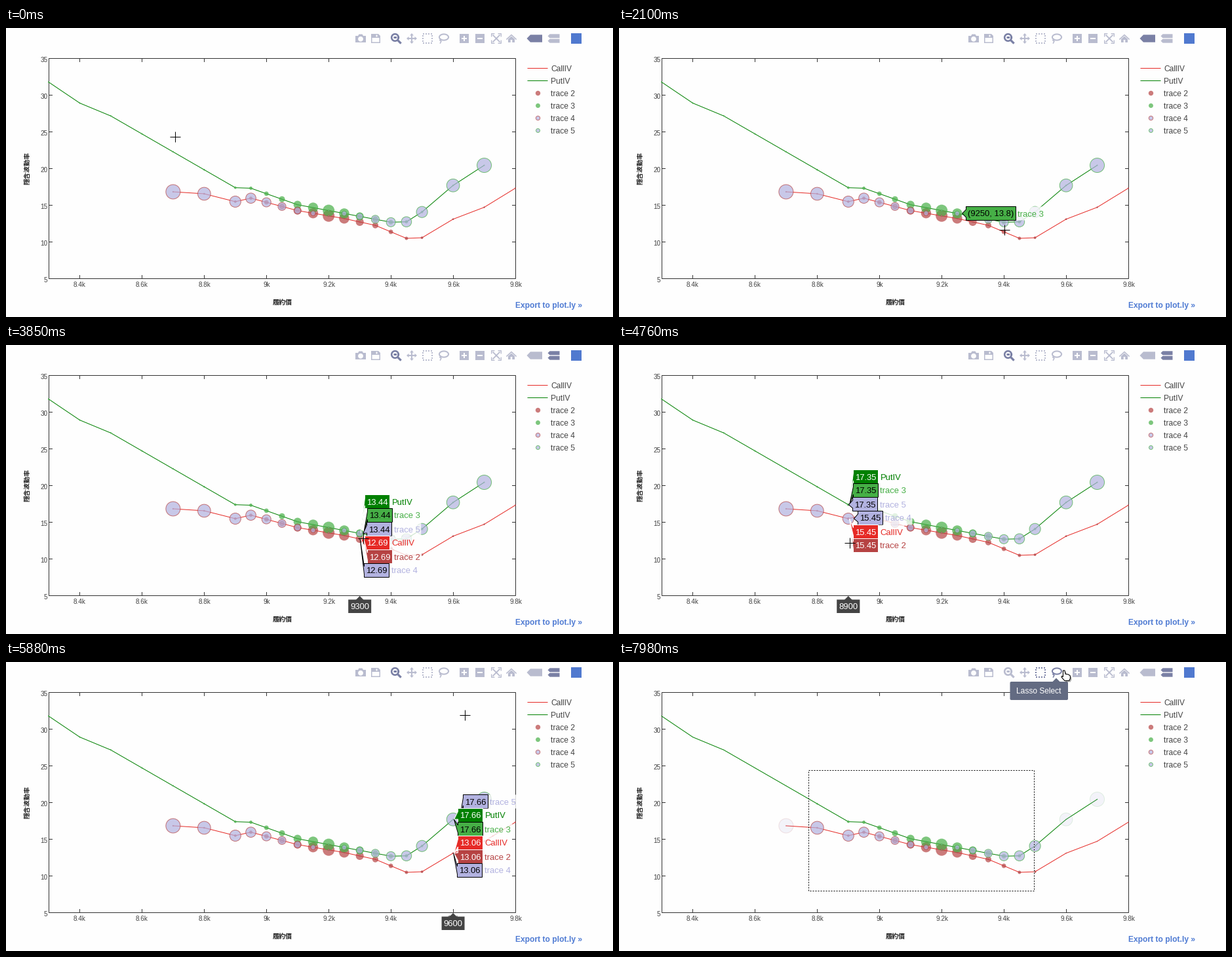
Write a matplotlib script that moves like this. It is 926x441 px and loops after 8000 ms.

```python
import numpy as np
import matplotlib
import matplotlib.pyplot as plt
from matplotlib.animation import FuncAnimation
from matplotlib.colors import to_rgba
from matplotlib.patches import Circle, FancyBboxPatch, Polygon, Rectangle

matplotlib.rcParams["font.family"] = ["Liberation Sans", "DejaVu Sans"]
matplotlib.rcParams["path.snap"] = False

W, H = 926, 441
PT = 0.72  # points per pixel at 100 dpi
LOOP, STEP, TICK = 8000, 40, 70
BG, INK, FRAME = "#fefefe", "#444444", "#333333"
LEFT, RIGHT, TOP, BOTTOM = 65.5, 777.5, 46.5, 382.5
RED, GREEN, ROSE, LEAF, LILAC = "#e62a26", "#008000", "#b64343", "#46af46", "#b2b2e0"
OFF, ON = "#b9bccf", "#7a80a5"

fig = plt.figure(figsize=(W / 100, H / 100), dpi=100, facecolor=BG)
ax = fig.add_axes([0, 0, 1, 1])
ax.set_xlim(0, W)
ax.set_ylim(H, 0)
ax.axis("off")


def px(k):
    return LEFT - 0.5 + (np.asarray(k) - 8300) * (RIGHT - LEFT) / 1500


def py(v):
    return BOTTOM - 0.5 - (np.asarray(v) - 5) * (BOTTOM - TOP) / 30


def crisp(a):
    """Centre of the pixel that holds coordinate a."""
    return float(np.floor(a + 0.01)) + 0.5


def line(xs, ys, color, lw=1.0, **kw):
    return ax.plot(xs, ys, color=color, lw=lw * PT, **kw)[0]


def text(x, y, s, size, color=INK, **kw):
    kw.setdefault("va", "baseline")
    return ax.text(x, y, s, fontsize=size * PT, color=color, **kw)


def poly(pts, color, edge="none", lw=0, **kw):
    return ax.add_patch(Polygon(pts, facecolor=color, edgecolor=edge, lw=lw * PT, **kw))


widths = {}


def width(s, size):
    if (s, size) not in widths:
        probe = text(0, 0, s, size)
        widths[s, size] = probe.get_window_extent().width
        probe.remove()
    return widths[s, size]


# ---- data: strikes are sparse at the wings, dense near the money ----
strikes = np.array([k for k in range(8300, 9801, 50) if k % 100 == 0 or 8900 < k < 9500])
put_k, call_k = strikes[strikes <= 9700], strikes[strikes >= 8700]
put_v = np.interp(put_k, *zip(
    (8300, 31.74), (8400, 28.88), (8500, 27.12), (8900, 17.35), (8950, 17.28), (9100, 15.03),
    (9400, 12.65), (9450, 12.7), (9500, 14.04), (9600, 17.66), (9700, 20.4)))
call_v = np.interp(call_k, *zip(
    (8700, 16.79), (8800, 16.52), (8900, 15.45), (8950, 15.92), (9100, 14.23), (9250, 13.15),
    (9350, 12.22), (9450, 10.45), (9500, 10.53), (9600, 13.06), (9700, 14.68), (9800, 17.28)))


def volume(k):
    return 1 + 8 * np.exp(-(np.abs(k - 9200) / 175) ** 1.4)


def depth(k, wing):
    """Marker area shrinks evenly from the wing strike towards the money."""
    return np.sqrt(np.maximum(121 - 0.24 * np.abs(k - wing), 0.3))


calls, puts = (call_k, call_v), (put_k, put_v)
curve = {2: calls, 3: puts, 4: calls, 5: puts}
radius = {2: volume(call_k), 3: volume(put_k), 4: depth(call_k, 8700), 5: depth(put_k, 9700)}
fills = {0: GREEN, 1: RED, 2: ROSE, 3: LEAF, 4: LILAC, 5: LILAC}
edges = {2: ROSE, 3: LEAF, 4: ROSE, 5: LEAF}
names = ["PutIV", "CallIV"] + [f"trace {n}" for n in curve]

# ---- axes, titles and legend ----
ax.add_patch(Rectangle((LEFT, TOP), RIGHT - LEFT, BOTTOM - TOP, fill=False, ec=FRAME, lw=PT))
for k in range(8400, 9801, 200):
    x = crisp(px(k))
    text(x, 395, f"{k / 1000:g}k", 10, ha="center")
    if k < 9800:
        line([x, x], [BOTTOM, BOTTOM - 5], FRAME)
        line([x, x], [TOP, TOP + 5], FRAME)
for v in range(5, 36, 5):
    y = crisp(py(v))
    text(63.5, y + 5, str(v), 10, ha="right")
    if 5 < v < 35:
        line([LEFT, LEFT + 5], [y, y], FRAME)
        line([RIGHT, RIGHT - 5], [y, y], FRAME)
CJK = dict(family="Noto Sans CJK JP", weight="bold", ha="center", va="center")
text(421.5, 418.5, "履約價", 10, "#222222", **CJK)
text(32.5, 214, "隱含波動率", 10, "#222222", rotation=90, **CJK)
text(777, 427, "Export to plot.ly »", 12, "#4f7bd3", weight="bold")

line(px(call_k), py(call_v), RED)
line(px(put_k), py(put_v), GREEN)

for row, n in enumerate([1, 0, 2, 3, 4, 5]):
    y = 61.5 + 19 * row
    text(831, y + 4.5, names[n], 12)
    if n < 2:
        line([796, 826], [y, y], fills[n])
    else:
        ax.add_patch(Circle((811.5, y), 4.2 - 0.25 * n, fc=fills[n], ec=edges[n],
                            lw=PT if n > 3 else 0, alpha=0.7))

dots = {n: ax.scatter(px(ks), py(vs), s=(2 * radius[n] * PT) ** 2, zorder=3 + n / 10,
                      linewidths=PT if n > 3 else 0) for n, (ks, vs) in curve.items()}

# ---- mode bar ----
icons = {}
cutouts = []
ang = np.linspace(0, 2 * np.pi, 40)


def shape(name, pts):
    icons.setdefault(name, []).append(poly(pts, OFF, zorder=5))


def stroke(name, xs, ys, lw, **kw):
    icons.setdefault(name, []).append(line(xs, ys, OFF, lw, zorder=5, **kw))


def box(x0, y0, x1, y1):
    return [(x0, y0), (x1, y0), (x1, y1), (x0, y1)]


def oval(x, y, rx, ry):
    return x + rx * np.cos(ang), y + ry * np.sin(ang)


def cut(pts, color=BG):
    cutouts.append(poly(pts, color, zorder=6))


shape("camera", box(533, 12, 549, 22))
shape("camera", [(537, 12), (538.5, 9.5), (543.5, 9.5), (545, 12)])
cut(np.c_[oval(541, 16.8, 3.9, 3.9)])
stroke("camera", *oval(541, 16.8, 1.2, 1.2), 2, zorder_=None) if False else None
shape("save", [(557, 9), (568, 9), (571, 12), (571, 23), (557, 23)])
cut(box(558.5, 15, 569.5, 21.5))
cut(box(564.5, 10.5, 566.5, 13.5))
shape("zoom", box(591.5, 13, 596, 16))
stroke("zoom", *oval(593.5, 14.5, 5.3, 5.3), 2.6)
stroke("zoom", [598, 601.5], [19, 22.5], 3.2)
for dx, dy in [(1, 0), (-1, 0), (0, 1), (0, -1)]:
    x, y = 619 + 8 * dx, 16 + 8 * dy
    stroke("pan", [619, x - 2 * dx], [16, y - 2 * dy], 2)
    shape("pan", [(x, y), (x - 3.5 * dx + 3 * dy, y - 3.5 * dy + 3 * dx),
                  (x - 3.5 * dx - 3 * dy, y - 3.5 * dy - 3 * dx)])
stroke("select", [636, 650, 650, 636, 636], [9, 9, 23, 23, 9], 2, dashes=(1, 1),
       dash_capstyle="butt")
stroke("lasso", *oval(668, 14, 7, 4.6), 2)
stroke("lasso", [663, 661.8, 664, 662.5], [17, 18.8, 20, 23], 1.6)
for name, x in (("plus", 692), ("minus", 716)):
    shape(name, box(x, 9, x + 14, 23))
    cut(box(x + 3, 15, x + 11, 17))
cut(box(698, 12, 700, 20))
for sx in (-1, 1):
    for sy in (-1, 1):
        x, y = 748 + 7.3 * sx, 16 + 7.3 * sy
        stroke("fit", [x - 4 * sx, x, x], [y, y, y - 4 * sy], 1.4)
        stroke("fit", [748, x - 2.5 * sx], [16, y - 2.5 * sy], 1.8)
stroke("home", [764, 771, 778], [17, 10.5, 17], 1.6)
shape("home", [(766, 17), (771, 12.6), (776, 17), (776, 22), (766, 22)])
cut(box(769.7, 18, 772.3, 22))
shape("closest", [(794.5, 16), (800, 10.3), (818, 10.3), (818, 21.7), (800, 21.7)])
for y in (12.3, 19.7):
    shape("compare", [(826.5, y), (829.5, y - 3), (844.5, y - 3), (844.5, y + 3), (829.5, y + 3)])
cut(box(862, 8, 878, 24), "#5079cf")

tips = {"zoom": (595, "Zoom"), "pan": (619, "Pan"), "select": (643, "Box Select"),
        "lasso": (667, "Lasso Select"), "closest": (806, "Show closest data on hover"),
        "compare": (835, "Compare data on hover")}

# ---- pointer: key stops (time, x, y) with straight moves between ----
COMPARE_AT, SELECT_AT, PRESS, DONE, RELEASE = 2450, 6370, 6930, 7400, 7490
stops = np.array([
    (0, 258, 166), (210, 158, 134), (480, 374, 245), (800, 590, 298), (1120, 424, 264),
    (1260, 387, 230), (1470, 216, 174), (1700, 385, 246), (2100, 588, 308), (2380, 842, 14),
    (2520, 842, 14), (2940, 675, 283), (4200, 495, 300), (4760, 352, 302), (5320, 116, 250),
    (5880, 700, 81), (6160, 612, 17), (SELECT_AT, 648, 15), (6580, 648, 15),
    (PRESS, 289.5, 165.5), (7120, 461.5, 273.5), (DONE, 633.5, 349.5),
    (RELEASE, 633.5, 349.5), (7980, 679, 13)])


def pos(t):
    return np.interp(t, stops[:, 0], stops[:, 1]), np.interp(t, stops[:, 0], stops[:, 2])


def inside(x, y):
    return LEFT <= x <= RIGHT and TOP <= y <= BOTTOM


cross = [line([0], [0], "black", zorder=40) for _ in range(2)]
lasso_box = [line([0], [0], c, zorder=8, ls=s) for c, s in ((BG, "-"), ("black", (0, (2, 2))))]
hand_pts = np.array([(-1.5, 0), (1, 0), (2, 5.3), (6.5, 6), (9.3, 8), (9.5, 12),
                     (7.7, 15.5), (0.7, 15.5), (-4, 10), (-3.4, 8.4), (-1.6, 9.6)])
shadow = poly(hand_pts, "black", alpha=0.3, zorder=40)
hand = poly(hand_pts, "white", "black", 1.1, zorder=41)
live = []


def label(x, y, cy, value, name, color, z):
    """Hover box at height cy whose pointer ends at (x, y)."""
    fg = "black" if color in (LEAF, LILAC) else "white"
    x0, cy = crisp(x + 6), crisp(cy) - 0.5
    x1 = x0 + round(width(value, 13) + 6)
    live.append(ax.add_patch(Rectangle((x1, cy - 10.5), width(name, 13) + 5, 21, fc=BG, lw=0,
                                       alpha=0.8, zorder=z)))
    live.append(poly([(x, y), (x0, cy + 6), (x0, cy + 10.5), (x1, cy + 10.5),
                      (x1, cy - 10.5), (x0, cy - 10.5), (x0, cy - 6)], color, fg, 1, zorder=z))
    live.append(text(x0 + 3, cy + 4.5, value, 13, fg, zorder=z))
    live.append(text(x1 + 3, cy + 4.5, name, 13, color, zorder=z))


def hover_closest(x, y):
    best, hit = 20, None
    for n, (ks, vs) in curve.items():
        d = np.hypot(px(ks) - x, py(vs) - y) - radius[n] / 50
        if d.min() < best:
            best, hit = d.min(), (n, int(d.argmin()))
    if hit:
        n, j = hit
        k, v = curve[n][0][j], curve[n][1][j]
        label(px(k) + radius[n][j], py(v), float(py(v)), f"({k}, {v:.3g})", names[n], fills[n], 20)


def hover_compare(x, t):
    k = put_k[np.abs(px(put_k) - x).argmin()]
    kx = float(px(k))
    if abs(kx - x) > 25:
        return
    groups = []
    for (ks, vs), order in ((puts, [5, 0, 3] if t > 5100 else [0, 3, 5]),
                            (calls, [4, 1, 2] if k < 9150 else [1, 2, 4])):
        j = np.flatnonzero(ks == k)
        if len(j):
            groups.append((float(py(vs[j[0]])), vs[j[0]], order, j[0]))
    mids = [g[0] for g in groups]
    if len(mids) == 2 and abs(mids[1] - mids[0]) < 63:
        m = sum(mids) / 2
        mids = [m - 31.5, m + 31.5]
    z = 20
    for m, (y, v, order, j) in zip(mids, groups):
        for i, n in enumerate(order):
            dx = radius[n][j] if n > 1 else 1.5
            label(kx + dx, y, m + 21 * (i - 1), f"{v:.4g}", names[n], fills[n], z)
            z += 1
    half = width(str(k), 13) / 2 + 3
    live.append(poly(box(kx - half, 388.5, kx + half, 409), INK, zorder=20))
    live.append(poly([(kx, 383), (kx + 6, 389), (kx - 6, 389)], INK, zorder=20))
    live.append(text(kx, 403, str(k), 13, "white", ha="center", zorder=21))


def tooltip(name):
    cx, s = tips[name]
    w, x1, gray = width(s, 12) + 20, cx + 18, "#636b82"
    live.append(ax.add_patch(FancyBboxPatch((x1 - w + 2, 32), w - 4, 24, fc=gray, lw=0, zorder=30,
                                            boxstyle="round,pad=2,rounding_size=2")))
    live.append(poly([(cx - 6, 30.5), (cx, 24.5), (cx + 6, 30.5)], gray, zorder=30))
    live.append(text(x1 - w / 2, 48, s, 12, "white", ha="center", zorder=31))


def paint_dots(t):
    """Draw the selection box, which trails the pointer, and dim what it leaves out."""
    (x0, y0), (x1, y1) = pos(PRESS), pos(np.clip(t - 20, PRESS, DONE))
    chosen = t >= PRESS
    for part in lasso_box:
        part.set_visible(chosen)
        part.set_data([x0, x1, x1, x0, x0], [y0, y0, y1, y1, y0])
    for n, (ks, vs) in curve.items():
        xs, ys = px(ks), py(vs)
        keep = (xs > x0) & (xs < x1 + 2) & (ys > y0) & (ys < y1)
        alpha = np.where(keep | (not chosen), 0.7, 0.14)
        for color, setter in ((fills[n], dots[n].set_facecolor), (edges[n], dots[n].set_edgecolor)):
            rgba = np.tile(to_rgba(color), (len(ks), 1))
            rgba[:, 3] = alpha
            setter(rgba)


def draw(i):
    t = (i * STEP + STEP // 2) // TICK * TICK
    while live:
        live.pop().remove()
    x, y = pos(t)
    dragging = PRESS <= t < RELEASE
    paint_dots(t)

    over = next((n for n, (cx, _) in tips.items() if abs(x - cx) <= 12 and y < 28), None)
    lit = {"compare" if t >= COMPARE_AT else "closest", "select" if t >= SELECT_AT else "zoom", over}
    for name, parts in icons.items():
        for part in parts:
            part.set_color(ON if name in lit else OFF)
            part.set_visible(not dragging)
    for part in cutouts:
        part.set_visible(not dragging)
    if over:
        tooltip(over)

    if t < COMPARE_AT:
        lx, ly = pos(max(t - 2 * TICK, 0))
        if inside(lx, ly):
            hover_closest(lx, ly)
    elif inside(x, y) and not dragging:
        hover_compare(x, t)

    on_bar = y < 30
    cx, cy = crisp(x), crisp(y)
    cross[0].set_data([cx - 7.5, cx + 7.5], [cy, cy])
    cross[1].set_data([cx, cx], [cy - 7.5, cy + 7.5])
    for part in cross:
        part.set_visible(not on_bar)
    for part, shift in ((hand, 0), (shadow, 2)):
        part.set_xy(hand_pts + (x + shift, y + shift))
        part.set_visible(on_bar)
    return []


anim = FuncAnimation(fig, draw, frames=LOOP // STEP, interval=STEP, init_func=lambda: [],
                     repeat=True, repeat_delay=0, blit=False)
plt.show()
```
